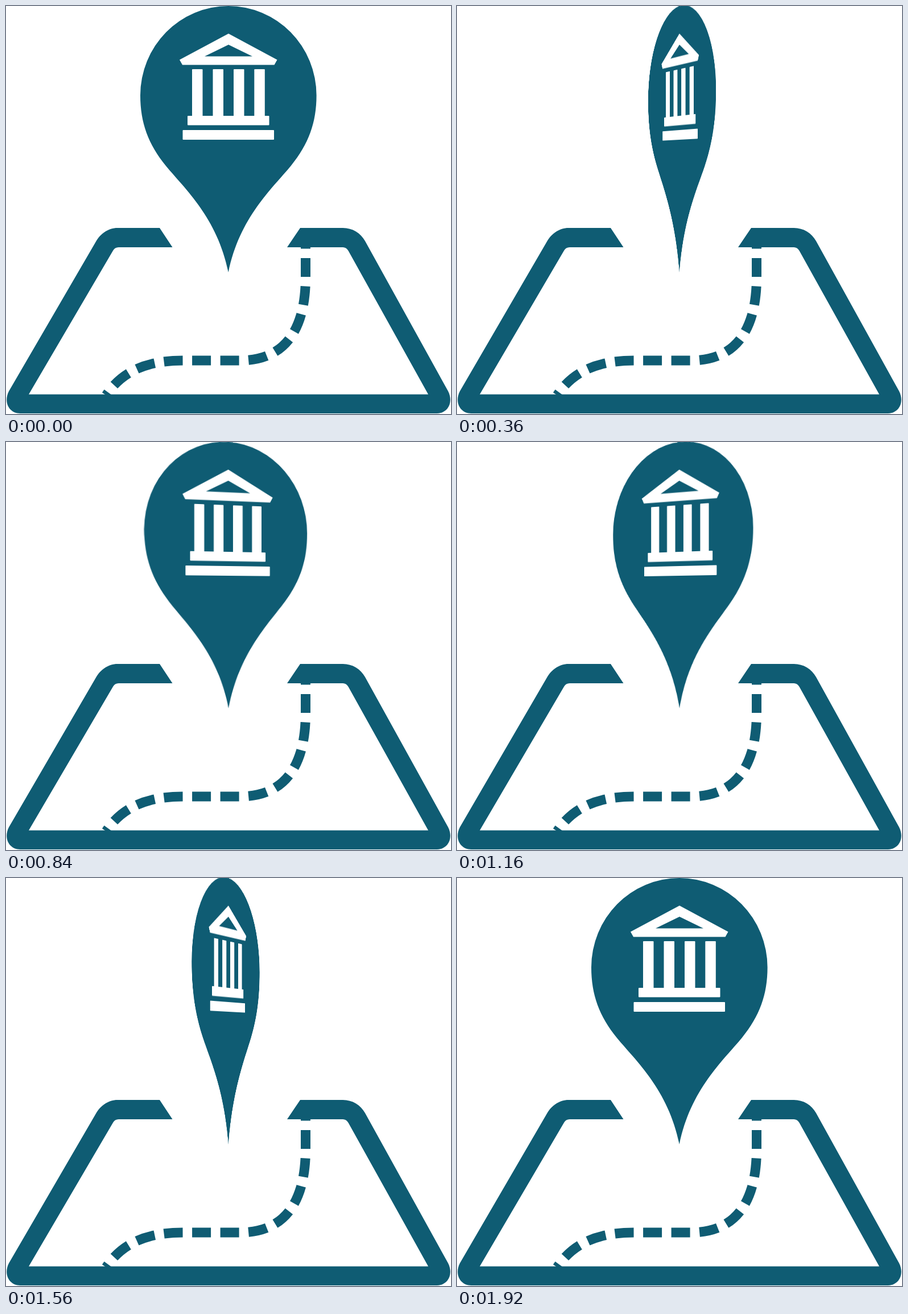
An HTML page for the animation above (1.96 s loop, 782x717 px).

```html
<!DOCTYPE html>
<html lang="en">
<head>
<meta charset="utf-8">
<title>Map pin</title>
<style>
  html, body {
    margin: 0;
    width: 782px;
    height: 717px;
    overflow: hidden;
    background: #fff;
  }
  body { position: relative; }
  svg {
    position: absolute;
    left: 0;
    top: 0;
    fill: #0f5c73;
  }
  .route {
    fill: none;
    stroke: #0f5c73;
    stroke-width: 17;
    stroke-dasharray: 33 16.5;
  }
  .icon { fill: #fff; }

  /* One full turn in 7.5 degree steps, the flat pose held at both ends */
  .pin {
    transform-origin: 390.8px 275px;
    animation: turn 1960ms steps(49, jump-none) infinite;
  }
  @keyframes turn {
    from { transform: perspective(1780px) rotateY(0deg); }
    to { transform: perspective(1780px) rotateY(-360deg); }
  }
</style>
</head>
<body>
<svg class="map" width="782" height="717" viewBox="0 0 782 717">
  <path class="route" d="M526.5 393.5V476C526.5 573 487 623 411 623H312C255 623 207 637 176 684"/>
  <path d="M270 390H196C180 390 166 400 158 414L5 677C-5 697 6 716 25 716H757
           C776 716 787 697 777 677L631 413C623 399 609 390 592 390H517L494 424H592
           Q598 424 601.500 430L742 682.500H40L188 430Q191 424 198 424H292.500Z"/>
</svg>
<svg class="pin" width="782" height="717" viewBox="0 0 782 717">
  <path d="M236 157A154.800 157 0 0 1 545.600 157C545.600 205 531.600 243 500.600 281
           C467.600 321 410.300 372 390.800 468C371.300 372 314 321 281 281C250 243 236 205 236 157Z"/>
  <g class="icon">
    <path fill-rule="evenodd" d="M391 48.500L476.500 94.500L471.500 103.500H310L305 94.500Z
                                 M391 68L349 88.500H433Z"/>
    <rect x="327" y="111" width="18.500" height="83" rx="1"/>
    <rect x="363.500" y="111" width="18.500" height="83" rx="1"/>
    <rect x="400" y="111" width="18.500" height="83" rx="1"/>
    <rect x="436.300" y="111" width="18.500" height="83" rx="1"/>
    <rect x="319" y="193" width="143.500" height="16.500" rx="1"/>
    <rect x="310.500" y="218" width="160.500" height="17" rx="1"/>
  </g>
</svg>
</body>
</html>
```
